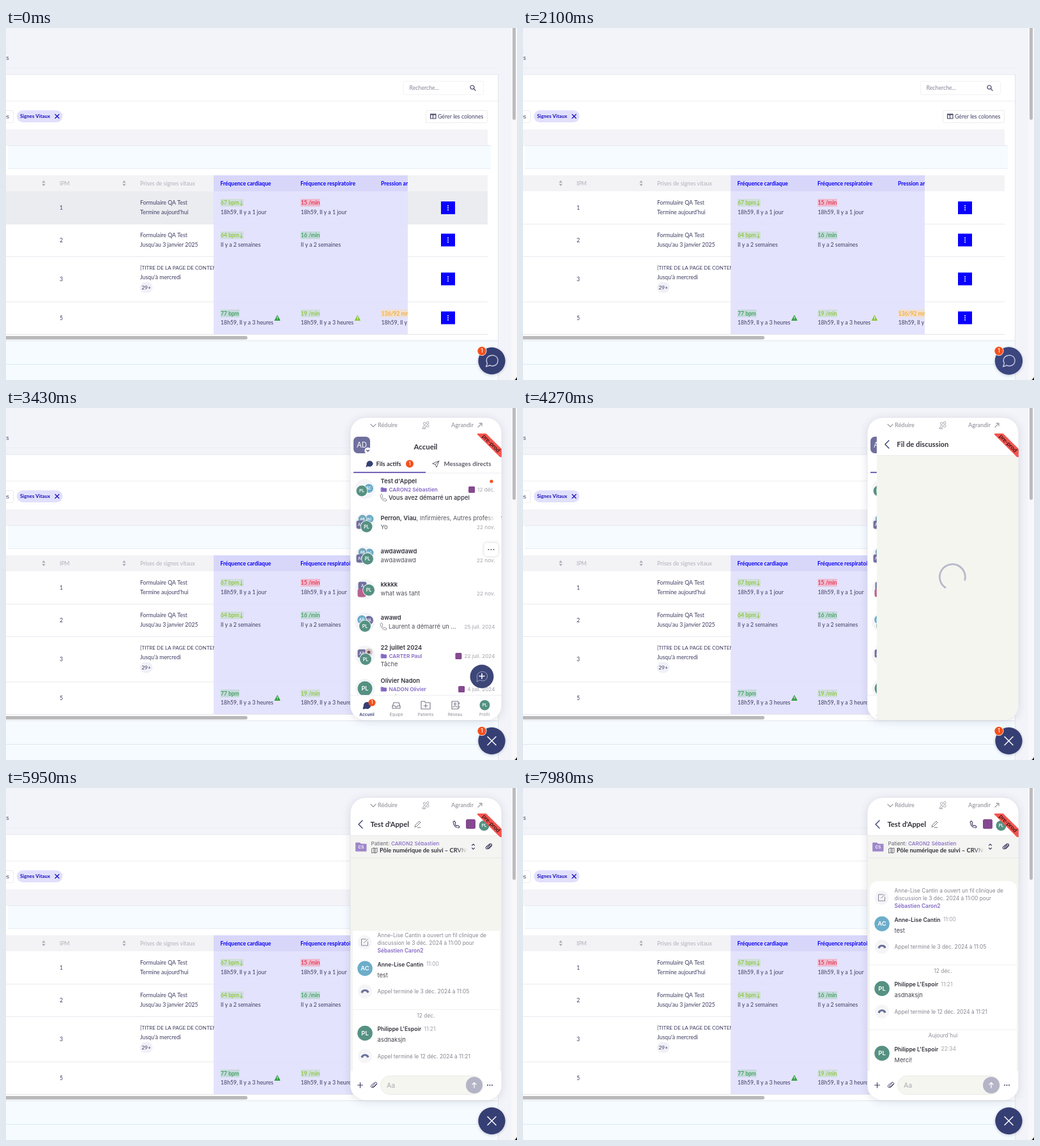
An HTML page with a canvas that plays this animation: 800x552 px, repeating every 8000 ms.

```html
<!DOCTYPE html>
<html lang="fr">
<head>
<meta charset="utf-8">
<title>Messagerie</title>
<style>
html, body { margin: 0; width: 100%; height: 100%; overflow: hidden; background: #f3f4f9; }
canvas { display: block; width: 800px; height: 552px; }
</style>
</head>
<body>
<canvas id="stage" width="800" height="552"></canvas>
<script>
const LOOP = 8000, OPEN = 2368, NAV = 4060, LOADED = 4960, READ = 5180;
const TYPE = 6230, SENT = 7280, SCROLL = 7490;
const LATO = 'Lato, sans-serif', INTER = 'Inter, sans-serif';
const NAVY = '#363f73', INK = '#3f3e63', BLUE = '#0a00f5', PURPLE = '#8368c4';
const GREEN = '#559182', SKY = '#6cadc9', VIOLET = '#6f6f9e', ORANGE = '#f4511e';
const LOGO = '#85498f', GREY = '#a2a2ab', BEIGE = '#f4f5ef', DARK = '#32323c';

const stage = document.getElementById('stage').getContext('2d');
const layer = document.createElement('canvas');
layer.width = 800; layer.height = 552;
const sheet = layer.getContext('2d');
let g = stage;

const clamp = v => Math.max(0, Math.min(1, v));
const easeOut = v => 1 - (1 - clamp(v)) ** 3;
const easeInOut = v => (1 - Math.cos(Math.PI * clamp(v))) / 2;

function rect(x, y, w, h, fill, r = 0, line) {
  g.beginPath();
  g.roundRect(x, y, w, h, r);
  if (fill) { g.fillStyle = fill; g.fill(); }
  if (line) { g.strokeStyle = line; g.lineWidth = 1; g.stroke(); }
}
function disc(x, y, r, fill) {
  g.beginPath();
  g.arc(x, y, r, 0, 7);
  g.fillStyle = fill;
  g.fill();
}
function text(s, x, y, size, color, weight = 400, font = LATO, align = 'left') {
  g.font = `${weight} ${size}px ${font}`;
  g.textAlign = align;
  g.fillStyle = color;
  g.fillText(s, x, y + size * 0.35);
}
const chat = (s, x, y, size, color, weight, align) => text(s, x, y, size, color, weight, INTER, align);
function icon(d, x, y, color, width = 1, fill) {
  g.save();
  g.translate(x, y);
  const p = new Path2D(d);
  if (fill) { g.fillStyle = color; g.fill(p); }
  g.strokeStyle = color; g.lineWidth = width;
  g.lineCap = g.lineJoin = 'round';
  g.stroke(p);
  g.restore();
}
function clipped(x, y, w, h, draw, r = 0) {
  g.save();
  g.beginPath();
  g.roundRect(x, y, w, h, r);
  g.clip();
  draw();
  g.restore();
}
function fadeRight(x, y, w, h, rgb) {
  const grad = g.createLinearGradient(x, 0, x + w, 0);
  grad.addColorStop(0, `rgba(${rgb},0)`);
  grad.addColorStop(1, `rgb(${rgb})`);
  rect(x, y, w, h, grad);
}

const CROSS = 'M-3 -3L3 3M3 -3L-3 3';
const DOWN = 'M-4 -2L0 2L4 -2';
const BACK = 'M3 -6L-3 0L3 6';
const PHONE = 'M-5 -4C-4 2 -1 5 4 5L5 3L2 1L0 2C-1 1 -2 0 -2 -2L-1 -3L-3 -6Z';
const HANGUP = 'M-6 1C-5 -4 5 -4 6 1L3.5 2L2.5 0C1 -1 -1 -1 -2.5 0L-3.5 2Z';
const FOLDER = 'M-4 -3H-1L0 -2H4V3H-4Z';
const BUBBLE = 'M-5 4L-4 1C-5 -7 6 -6 5 0C4 4 0 4 -2 3Z';
const PLANE = 'M-5 -1L5 -5L1 5L-1 1ZM-1 1L5 -5';
const CLIP = 'M4 -2L-1 3C-4 5 -6 2 -4 0L1 -4C3 -6 6 -3 4 -1L0 3C-2 4 -3 2 -2 1L2 -3';
const PEN = 'M-4 4L-3 1L3 -5L5 -3L-1 3ZM0 5H5';

/* ---------- table ---------- */
function kebab(y) {
  rect(681, y - 10, 22, 20, '#0a00ff');
  for (const d of [-3.2, 0, 3.2]) disc(692, y + d, 1, '#fff');
}
function sorter(x) {
  icon('M-2 -1.5L0 -4L2 -1.5ZM-2 1.5L0 4L2 1.5Z', x, 243.5, '#a3a3ad', 0.5, true);
}
function measure(x, y, value, note, color, back) {
  g.font = `500 8.6px ${LATO}`;
  rect(x, y - 6, g.measureText(value).width + 0.5, 12, back);
  text(value, x, y, 8.6, color, 500);
  text(note, x, y + 14.5, 8.75, INK);
}
function warning(x, color) {
  icon('M0 -4L4 3.5H-4Z', x, 455, color, 1, true);
  rect(x - 0.5, 452.5, 1, 3, '#fff');
  rect(x - 0.5, 456.3, 1, 1, '#fff');
}
function page(t) {
  rect(0, 0, 800, 552, '#f3f4f9');
  rect(0, 62, 770, 1, '#ededf2');
  text('ts', -2.5, 47, 8.75, INK);
  rect(0, 73, 770, 417, '#fff');
  rect(0, 72.5, 770.5, 1, '#e8e9f0');
  rect(770, 73, 1, 479, '#e3e5ee');
  rect(0, 114, 770, 1, '#eeeef3');
  rect(622.5, 83.5, 125, 21, '#fff', 2, '#f2f2f6');
  text('Recherche...', 631.5, 94, 8.75, '#85859b');
  icon('M3 0A3 3 0 1 1 -3 0A3 3 0 1 1 3 0M2.2 2.2L5 5', 730, 93, INK, 1.2);
  rect(-5, 129.5, 16.5, 19, '#fff', 2, '#ececf1');
  text('es', -3.5, 138.5, 8.75, INK);
  rect(17, 129, 71.5, 19, '#e1e0fc', 9.5);
  text('Signes Vitaux', 22, 138.5, 7.8, '#170bbb', 700);
  icon(CROSS, 80, 138.5, '#170bbb', 1.2);
  rect(657.5, 129.5, 96, 19, '#fff', 2, '#ececf1');
  icon('M-4 -3.5H4.5V3.5H-4ZM-4 -2.5H4.5M0 -3V3', 668.5, 138.5, INK, 1.1);
  text('Gérer les colonnes', 676, 138.5, 8.8, INK);
  rect(0, 159, 754, 26, '#f3f3f8');
  rect(3, 184, 756, 37, '#f5fbff');
  rect(3, 184, 756, 1, '#e5eaf2');
  rect(3, 220, 756, 1, '#e7eef4');

  rect(0, 231, 754, 25, '#f3f3f6');
  const hover = 1 - clamp((t - 70) / 280);
  if (hover) rect(0, 256, 754, 51, `rgba(234,236,240,${hover})`);
  rect(325, 231, 304, 25, '#d8d7fa');
  rect(325, 256, 304, 225, '#e4e3fd');
  for (const y of [307, 358, 429]) {
    rect(0, y, 325, 1, '#ebebf0');
    rect(325, y, 304, 1, '#e2e1fb');
    rect(629, y, 125, 1, '#ebebf0');
  }
  rect(0, 480, 754, 1, '#e4e4ea');
  sorter(59); sorter(185);
  text('IPM', 84, 243.5, 8.6, '#b0b0bb');
  text('Prises de signes vitaux', 210, 243.5, 8.75, '#b0b0bb');
  ['1', '2', '3', '5'].forEach((n, i) => {
    const y = [282, 332.5, 393.5, 454.5][i];
    text(n, 84, y, 8.75, INK);
    kebab(y);
  });
  clipped(200, 231, 125.5, 250, () => {
    text('Formulaire QA Test', 210, 274, 8.75, INK);
    text("Termine aujourd'hui", 210, 289, 8.75, INK);
    text('Formulaire QA Test', 210, 325, 8.75, INK);
    text("Jusqu'au 3 janvier 2025", 210, 339.5, 8.75, INK);
    text('[TITRE DE LA PAGE DE CONTENU]', 210, 376, 8.1, INK);
    text("Jusqu'à mercredi", 210, 390.5, 8.75, INK);
    rect(209.5, 398.5, 20, 17, '#f0f0f7', 8.5);
    text('29+', 219.5, 407, 8.4, INK, 400, LATO, 'center');
  });
  clipped(325, 231, 304, 250, () => {
    const lime = '#86c32a', green = '#31964d', pale = '#cfdedb', mint = '#c3dadb';
    const today = '18h59, Il y a 1 jour', weeks = 'Il y a 2 semaines', hours = '18h59, Il y a 3 heures';
    text('Fréquence cardiaque', 335.5, 243.5, 8.6, BLUE, 700);
    text('Fréquence respiratoire', 461, 243.5, 8.6, BLUE, 700);
    text('Pression artérielle', 587, 243.5, 8.6, BLUE, 700);
    measure(336, 274, '67 bpm↓', today, lime, pale);
    measure(461.5, 274, '15 /min', today, '#e0243c', '#efbad0');
    measure(336, 325, '64 bpm↓', weeks, lime, pale);
    measure(461.5, 325, '16 /min', weeks, green, mint);
    measure(336, 447.5, '77 bpm', hours, green, mint);
    measure(461.5, 447.5, '19 /min', hours, lime, pale);
    measure(587.5, 447.5, '136/92 mmHg', hours, '#f5a623', '#f0dfcf');
    warning(425, '#2f9e41');
    warning(550.5, '#8bc53f');
  });
  rect(-4, 483, 382, 5.5, '#b9b9bb', 3);
  rect(0, 490, 770, 62, '#f5fbff');
  rect(0, 490, 770, 1, '#e3e5ec');
  rect(0, 527, 770, 1, '#dfe9f2');
  rect(791, 0, 9, 552, '#f8f8fa');
  rect(793, -4, 5, 148, '#bcbcbf', 2.5);
  icon('M4 -4C3 0 1 3 -3 4H4Z', 797, 549, '#000', 0.5, true);
}

/* ---------- floating button ---------- */
function badge(n, x, y, r) {
  disc(x, y, r, ORANGE);
  chat(n, x, y, r * 1.25, '#fff', 500, 'center');
}
function launcher(t) {
  const hot = t > 2100 && t < 2940;
  g.save();
  g.shadowColor = 'rgba(40,45,90,.25)'; g.shadowBlur = 4; g.shadowOffsetY = 1;
  disc(760.5, 522, hot ? 21.7 : 21.2, hot ? '#3b467f' : NAVY);
  g.restore();
  if (t < OPEN) icon('M-9 9L-7 4C-14 -10 10 -14 9.5 0C9 8 1 9 -3 7Z', 760.5, 522, '#c3c8de', 1.4);
  else icon('M-6.5 -6.5L6.5 6.5M6.5 -6.5L-6.5 6.5', 760.5, 522, '#fff', 1.5);
  if (t < READ) {
    disc(745, 506.5, 7.5, '#fff');
    badge('1', 745, 506.5, 6.7);
  }
}

/* ---------- chat panel ---------- */
function avatar(s, x, y, r, color) {
  disc(x, y, r + 0.8, '#fff');
  disc(x, y, r, color);
  chat(s, x, y, r * 0.8, '#fff', 600, 'center');
}
function tile(s, x, y, size, color) {
  rect(x - size / 2, y - size / 2, size, size, color, size / 4);
  chat(s, x, y, size * 0.45, '#fff', 500, 'center');
}
const me = (x, y, r = 9) => avatar('PL', x, y, r, GREEN);
const group = [
  y => { avatar('AC', 568, y - 1, 7, SKY); me(557, y + 3, 8.5); },
  y => { avatar('AC', 569, y - 6, 6.5, SKY); avatar('AB', 558, y - 6, 6.5, '#76a8bd'); tile('AR', 555, y + 3, 13, VIOLET); me(564.5, y + 6); },
  y => { avatar('AC', 569, y - 5, 6.5, SKY); avatar('AB', 558, y - 6, 6.5, '#76a8bd'); tile('AR', 555, y + 4, 13, VIOLET); me(566, y + 4.5); },
  y => { tile('A', 558, y - 5, 13, VIOLET); tile('', 557, y + 6, 13, '#b8628f'); me(568, y + 1.5); },
  y => { avatar('VA', 568, y - 3, 7, VIOLET); avatar('AB', 557, y - 4, 7, SKY); me(562, y + 6); },
  y => { tile('AR', 557, y - 3, 13, VIOLET); disc(568, y - 5, 6, '#d9c8c8'); disc(568, y - 5, 2.5, '#6b5561'); me(563, y + 6); },
  y => me(562, y, 11.5)
];
// [title, title y, avatar y, patient, message, date, call]
const threads = [
  ["Test d'Appel", 115, 127, 'CARON2 Sébastien', 'Vous avez démarré un appel', '12 déc.', 1],
  ['', 173, 180, '', 'Yo', '22 nov.'],
  ['awdawdawd', 225, 232, '', 'awdawdawd', '22 nov.'],
  ['kkkkk', 277, 284, '', 'what was taht', '22 nov.'],
  ['awawd', 329, 336, '', 'Laurent a démarré un ...', '25 juil. 2024', 1],
  ['22 juillet 2024', 376, 388, 'CARTER Paul', 'Tâche', '22 juil. 2024'],
  ['Olivier Nadon', 428, 440, 'NADON Olivier', 'Merci', '4 juil. 2024']
];
function threadRow([title, y, ay, patient, message, date, call], i) {
  disc(562, ay, 15.5, '#f4f4f8');
  group[i](ay);
  chat(title, 586.5, y, 9.4, DARK, 600);
  if (i === 1) {
    chat('Perron, Viau', 586.5, y, 9.4, DARK, 600);
    const w = g.measureText('Perron, Viau').width;
    chat(', Infirmières, Autres professionnels', 586.5 + w, y, 9.3, '#55555f');
    rect(765, y - 7, 10, 14, '#fff');
    fadeRight(752, y - 7, 13, 14, '255,255,255');
  }
  const dy = y + (patient ? 13 : 14);
  chat(date, 765.5, dy, 8.2, GREY, 400, 'right');
  if (patient) {
    const w = g.measureText(date).width;
    icon(FOLDER, 591.5, dy, PURPLE, 1, true);
    chat(patient, 599.5, dy, 8.2, PURPLE, 600);
    rect(751.5 - w, dy - 5, 10, 10, LOGO, 1.5);
  }
  const my = y + (patient ? 26 : 14);
  if (call) icon(PHONE, 591, my, '#85858f', 0.9);
  chat(message, call ? 599 : 586.5, my, 9.35, i ? '#50505a' : DARK, i ? 400 : 500);
  if (!i) disc(760, y, 2.6, ORANGE);
}
function tabBar() {
  rect(539, 450, 237, 40, '#fff');
  rect(539, 450, 237, 1, '#eeeef2');
  icon(BUBBLE, 565, 467, NAVY, 2.6, true);
  badge('1', 573, 462, 5.6);
  icon('M-6 2L-4 -4H4L6 2V5H-6ZM-6 1H-2L-1 3H1L2 1H6', 611, 466, '#777785', 1.1);
  icon('M-7 -6H-2L0 -4H7V6H-7ZM0 -2V4M-3 1H3', 657, 466, '#777785', 1.1);
  icon('M-5 -6H5V6H-5ZM1.5 -2A1.5 1.5 0 1 1 -1.5 -2A1.5 1.5 0 1 1 1.5 -2M-3 3C-2 1 2 1 3 3M6.5 -4V-2M6.5 2V4', 703, 466, '#777785', 1.1);
  me(749.5, 466, 8);
  ['Accueil', 'Équipe', 'Patients', 'Réseau', 'Profil'].forEach((s, i) =>
    chat(s, 565 + 46 * i, 480.5, 6.5, i ? '#8b8b96' : NAVY, i ? 400 : 600, 'center'));
}
function home(t) {
  rect(539, 38, 237, 452, '#fff');
  tile('', 557, 58, 26, VIOLET);
  chat('AD', 557, 58, 11.5, '#fff', 400, 'center');
  disc(566.5, 67, 5.2, '#fff');
  icon('M-2 -1L0 1L2 -1', 566.5, 67, NAVY, 1.1);
  text('Accueil', 657, 61, 11.4, DARK, 700, LATO, 'center');
  icon(BUBBLE, 569, 88, NAVY, 1, true);
  text('Fils actifs', 579.5, 87.5, 9.4, DARK, 700);
  badge('1', 632, 87.5, 6);
  icon(PLANE, 673, 88, '#666673', 1);
  text('Messages directs', 685.5, 87.5, 9.75, '#5f5f6b', 700);
  rect(539, 101.5, 237, 1, '#eeeef2');
  rect(544, 100, 113, 2, '#7663bb');
  clipped(539, 103, 237, 347, () => {
    threads.forEach(threadRow);
    const row = Math.max(0, 6 - Math.floor((t - 3080) / 87));
    if (t >= 3080 && t < NAV) {
      const y = threads[row][1] - 3;
      g.save();
      g.shadowColor = 'rgba(0,0,0,.18)'; g.shadowBlur = 4;
      rect(748.5, y - 10.5, 22, 21, '#fff', 5);
      g.restore();
      for (const d of [-4, 0, 4]) disc(759.5 + d, y, 1, '#55555f');
    }
    g.globalAlpha = 0.96;
    disc(745, 421, 18.5, NAVY);
    g.globalAlpha = 1;
    icon('M-8 8L-7 4C-12 -9 9 -12 8.5 0C8 7 1 8 -3 6Z', 745, 421, '#9aa1c6', 1);
    icon('M-4 0H4M0 -4V4', 745, 420.5, '#fff', 1.6);
  });
  tabBar();
}
function spinner(t) {
  g.save();
  g.translate(657.5, 265);
  g.rotate((t - 4830) / 1000 * 2 * Math.PI);
  g.beginPath();
  g.arc(0, 0, 20, -0.6, Math.PI + 0.6);
  g.strokeStyle = '#b9b9c9'; g.lineWidth = 2.8; g.lineCap = 'round';
  g.stroke();
  g.restore();
}
function callEnd(y, s) {
  disc(562, y, 11, '#f5f5f7');
  icon(HANGUP, 562, y, '#686f98', 1, true);
  chat(s, 581.5, y + 0.5, 8.4, '#85858f');
}
function post(y, initials, color, name, hour, message) {
  avatar(initials, 562, y, 11.8, color);
  chat(name, 581.5, y - 6.5, 8.6, DARK, 600);
  const w = g.measureText(name).width;
  chat(hour, 586 + w, y - 6.5, 8.4, GREY);
  chat(message, 581.5, y + 10.5, 9.3, '#45454f');
}
function dayLine(y, s) {
  rect(543, y - 10, 230, 1, '#f0f0f2');
  chat(s, 657.5, y, 8.4, '#8d8d97', 400, 'center');
}
function messages(t) {
  const p = easeInOut((t - SCROLL) / 420);
  clipped(539, 109, 237, 335, () => {
    g.translate(0, -70 * p);
    rect(543, 224 - 8 * p, 230, 330, '#fff', [12 * p, 12 * p, 0, 0]);
    disc(561.5, 242, 11, '#f5f5f7');
    icon('M2 -5H-5V5H5V-1M-1 1L5 -5', 561.5, 242, '#85859a', 1);
    chat('Anne-Lise Cantin a ouvert un fil clinique de', 581.5, 231, 8.4, '#85858f');
    chat('discussion le 3 déc. 2024 à 11:00 pour', 581.5, 243, 8.4, '#85858f');
    chat('Sébastien Caron2', 581.5, 255, 8.4, PURPLE, 600);
    post(283, 'AC', SKY, 'Anne-Lise Cantin', '11:00', 'test');
    callEnd(319, 'Appel terminé le 3 déc. 2024 à 11:05');
    dayLine(357, '12 déc.');
    post(384.5, 'PL', GREEN, "Philippe L'Espoir", '11:21', 'asdnaksjn');
    callEnd(420.5, 'Appel terminé le 12 déc. 2024 à 11:21');
    if (t >= SCROLL) {
      dayLine(458.5, "Aujourd'hui");
      post(486, 'PL', GREEN, "Philippe L'Espoir", '22:34', 'Merci!');
    }
  });
}
function composer(t) {
  rect(539, 444, 237, 46, '#fff');
  icon('M-4 0H4M0 -4V4', 554.5, 466, INK, 1.2);
  icon(CLIP, 576, 466, INK, 1);
  rect(586.5, 451.5, 160, 29, '#f6f6f1', 14.5, '#e9e9e6');
  const count = t < TYPE || t >= SENT ? 0 : Math.min(6, 1 + Math.floor((t - TYPE) / 98));
  const typed = 'Merci!'.slice(0, count);
  chat(typed || 'Aa', 596, 466.5, typed ? 9.3 : 10.5, typed ? DARK : '#a9a9ad');
  const caretX = typed ? 596.5 + g.measureText(typed).width : 595.5;
  const since = t >= SENT ? SENT : t >= 6720 ? 6720 : t >= TYPE ? t : LOADED;
  if (Math.floor((t - since) / 500) % 2 === 0) rect(caretX, 458, 1, 15, '#33333d');
  disc(733, 466, 13, typed ? NAVY : '#b4b4c7');
  icon('M0 4V-4M-3 -1L0 -4L3 -1', 733, 466, '#fff', 1.3);
  for (const d of [-3.5, 0, 3.5]) disc(757.5 + d, 466, 1, INK);
}
function thread(t) {
  rect(539, 38, 237, 452, '#fff');
  rect(539, 75, 237, 415, BEIGE);
  icon(BACK, 555, 57, NAVY, 1.4);
  const ready = t >= LOADED;
  text(ready ? "Test d'Appel" : 'Fil de discussion', 570.5, 57, 11.2, DARK, 700);
  rect(539, 74, 237, 1, '#ececec');
  if (!ready) { spinner(t); return; }
  icon(PEN, 644, 57, '#777785', 1);
  icon(PHONE, 705, 57.5, INK, 1.1);
  rect(720, 49, 15, 15, LOGO, 2.5);
  me(748.5, 59, 8);
  rect(539, 75, 237, 34, '#f4f4f2');
  icon('M-8 -6H-2L0 -4H8V7H-8Z', 556, 92, '#9d87c9', 1, true);
  chat('CS', 556, 93, 6.5, '#fff', 600, 'center');
  chat('Patient: ', 571.5, 87, 8.2, '#62626e');
  const w = g.measureText('Patient: ').width;
  chat('CARON2 Sébastien', 571.5 + w, 87, 8.2, PURPLE, 500);
  icon('M-4 -3L-1 -4L1 -3L4 -4V3L1 4L-1 3L-4 4ZM-1 -4V3M1 -3V4', 577, 98, '#62626e', 0.9);
  clipped(585, 91, 137, 15, () => {
    text('Pôle numérique de suivi – CRVNO', 585, 98, 9.4, DARK, 700);
    fadeRight(704, 91, 18, 15, '244,244,242');
  });
  icon('M-2 -2L0 -4L2 -2M-2 2L0 4L2 2', 731.5, 92, INK, 1.1);
  icon(CLIP, 756, 92, INK, 1.1);
  rect(539, 109, 237, 1, '#e9e9e6');
  g.save();
  g.globalAlpha = clamp((t - LOADED + 60) / 240);
  messages(t);
  g.restore();
  composer(t);
}
function ribbon() {
  clipped(738, 40, 38, 37, () => {
    g.translate(759.5, 55.5);
    g.rotate(Math.PI / 4);
    rect(-40, -5.4, 80, 10.8, '#f5554f');
    text('pre-prod', 0, -0.3, 9.2, '#12090c', 500, LATO, 'center');
  });
}
function panel(t) {
  g.save();
  g.shadowColor = 'rgba(60,60,100,.14)'; g.shadowBlur = 14; g.shadowOffsetY = 2;
  rect(539, 15, 237, 475, '#fff', 24);
  g.restore();
  clipped(539, 15, 237, 475, () => {
    icon(DOWN, 575, 27.5, GREY, 1.3);
    text('Réduire', 582, 27, 9, GREY, 700);
    for (const [x, y] of [[655, 24], [660, 23], [655, 29], [660, 28]])
      rect(x - 1.5, y - 1.5, 3.4, 3.4, null, 1.2, GREY);
    icon('M-5 3V5H0', 657, 27.5, GREY, 1);
    text('Agrandir', 697, 27, 9.1, GREY, 700);
    icon('M-3 3L3 -3M-1 -3H3V1', 742, 27, GREY, 1.3);
    const p = easeOut((t - NAV) / 350);
    if (p < 1) home(t);
    if (t >= NAV) {
      g.save();
      g.translate(237 * (1 - p), 0);
      thread(t);
      g.restore();
    }
    ribbon();
  }, 24);
  rect(539, 15, 237, 475, null, 24, 'rgba(210,210,222,.4)');
}

function render(t) {
  g = stage;
  page(t);
  if (t >= OPEN) {
    const e = t > 2940 ? 0 : Math.exp(-(t - OPEN) / 80);
    g = sheet;
    g.clearRect(0, 0, 800, 552);
    panel(t);
    g = stage;
    g.save();
    g.globalAlpha = 1 - e;
    g.translate(657.5, 252.5 + 46.7 * e);
    g.scale(1 - 0.113 * e, 1 - 0.113 * e);
    g.drawImage(layer, -657.5, -252.5);
    g.restore();
  }
  launcher(t);
}

const start = performance.now();
function tick() {
  render((performance.now() - start) % LOOP);
  requestAnimationFrame(tick);
}
tick();
</script>
</body>
</html>
```
